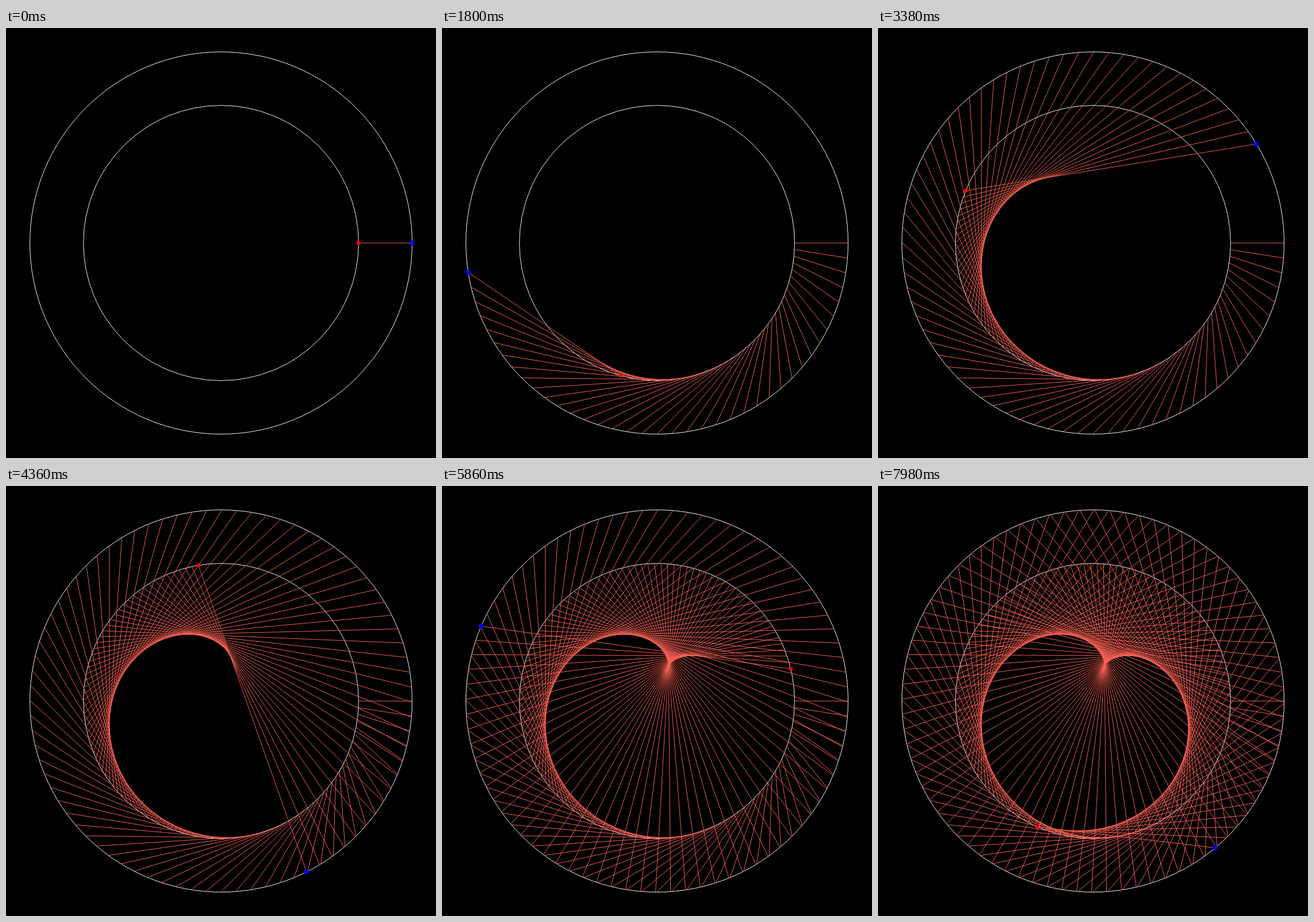
These frames come from a looping animation (748 by 748 pixels, 8 s). An HTML page:

```html
<!DOCTYPE html>
<html lang="en">
<head>
<meta charset="utf-8">
<title>Orbit chords</title>
<style>
  html, body { margin: 0; width: 100%; height: 100%; overflow: hidden; background: #000; }
  svg { display: block; width: 100%; height: 100%; }
  .orbit { fill: none; stroke: #fff; stroke-width: 0.95; }
  .chord { stroke: #fc6255; stroke-width: 0.95; }
</style>
</head>
<body>
<svg viewBox="0 0 748 748">
  <rect width="748" height="748" fill="#000"/>
  <g id="orbits"></g>
  <g id="chords"></g>
  <circle id="inner" r="3.4" fill="#f00"/>
  <circle id="outer" r="4.3" fill="#00f"/>
</svg>
<script>
const LOOP = 8000, STEPS = 172, CENTER = 374;
const TURN = 2 * Math.PI / 1039;
const INNER = { radius: 239.36, step: 8 * TURN };
const OUTER = { radius: 332.45, step: 13 * TURN };

const byId = id => document.getElementById(id);

function add(parent, tag, attrs) {
  const el = document.createElementNS('http://www.w3.org/2000/svg', tag);
  for (const name in attrs) el.setAttribute(name, attrs[name]);
  return parent.appendChild(el);
}

function place(body, k) {
  const angle = body.step * k;
  return [CENTER + body.radius * Math.cos(angle), CENTER + body.radius * Math.sin(angle)];
}

function moveTo(dot, [x, y]) {
  dot.setAttribute('cx', x);
  dot.setAttribute('cy', y);
}

// Steps come in threes, lasting 20, 100 and 20 ms.
function stepAt(t) {
  const rest = t % 140;
  return Math.floor(t / 140) * 3 + (rest >= 20) + (rest >= 120);
}

for (const { radius } of [INNER, OUTER])
  add(byId('orbits'), 'circle', { class: 'orbit', cx: CENTER, cy: CENTER, r: radius });

const chords = Array.from({ length: STEPS }, (_, k) => {
  const [x1, y1] = place(INNER, k), [x2, y2] = place(OUTER, k);
  return add(byId('chords'), 'line', { class: 'chord', x1, y1, x2, y2 });
});
const innerDot = byId('inner'), outerDot = byId('outer');

function draw(t) {
  const k = stepAt(t);
  chords.forEach((line, i) => line.setAttribute('visibility', i <= k ? 'visible' : 'hidden'));
  moveTo(innerDot, place(INNER, k));
  moveTo(outerDot, place(OUTER, k));
}

const start = performance.now();
function tick() {
  draw((performance.now() - start) % LOOP);
  requestAnimationFrame(tick);
}
tick();
</script>
</body>
</html>
```
